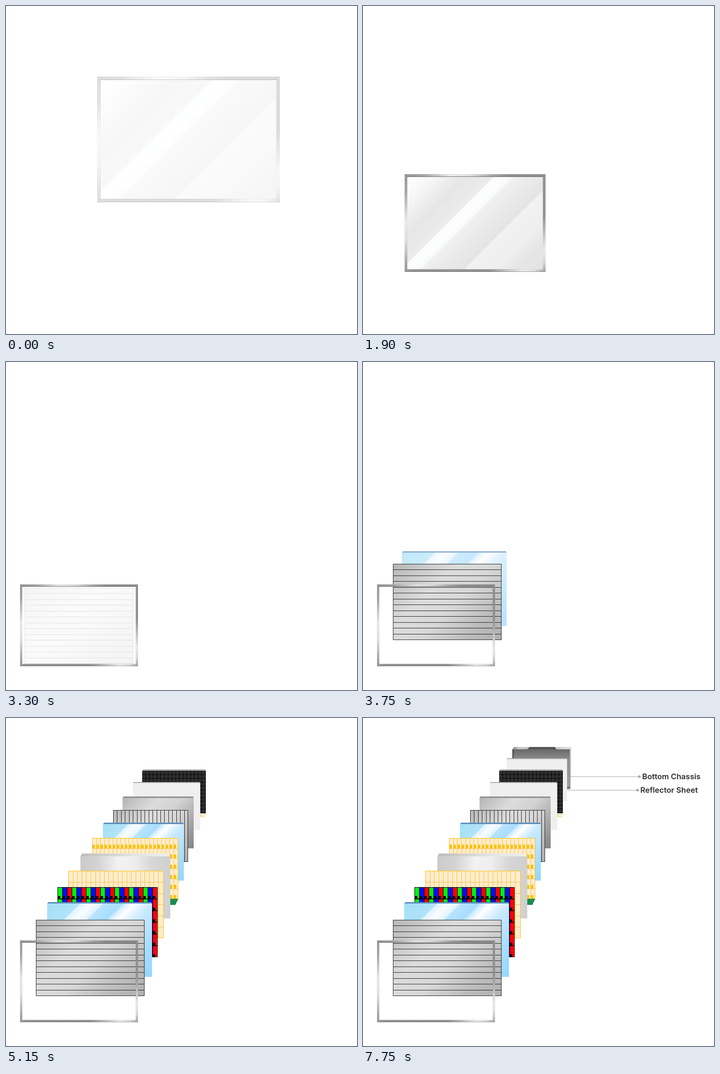
Animation of 750 by 702 pixels, one loop 8 s. Source, as an HTML page with a canvas:

```html
<!DOCTYPE html>
<html lang="en">
<head>
<meta charset="utf-8">
<style>
  html, body { margin: 0; width: 100%; height: 100%; overflow: hidden; background: #fff; }
  canvas { display: block; }
</style>
</head>
<body>
<canvas id="stage" width="750" height="702"></canvas>
<script>
const W = 750, H = 702, LOOP = 8000;
const stage = document.getElementById('stage').getContext('2d');
const clamp = v => Math.max(0, Math.min(1, v));
const mix = (a, b, p) => a + (b - a) * p;

// Stops are written as "offset colour, offset colour, ..."
function gradient(c, x0, y0, x1, y1, stops) {
  const g = c.createLinearGradient(x0, y0, x1, y1);
  for (const stop of stops.split(',')) {
    const [at, colour] = stop.trim().split(' ');
    g.addColorStop(+at, colour);
  }
  return g;
}
// 45 degree sweep from the top left to the bottom right corner
function diagonal(c, x, y, w, h, stops) {
  const d = (w + h) / 2;
  return gradient(c, x, y, x + d, y + d, stops);
}
function rect(c, x, y, w, h, fill) {
  c.fillStyle = fill;
  c.fillRect(x, y, w, h);
}
function poly(c, fill, ...p) {
  c.beginPath();
  for (let i = 0; i < p.length; i += 2) c.lineTo(p[i], p[i + 1]);
  c.closePath();
  c.fillStyle = fill;
  c.fill();
}

const METAL = '0 #989898, .08 #a8a8a8, .2 #f0f0f0, .28 #e4e4e4, .38 #a8a8a8, .44 #939393, .76 #939393, .9 #f0f0f0, .95 #e0e0e0, 1 #a0a0a0';
const SHEEN = '0 #fff, .1 #f8f8f8, .25 #e6e6e6, .38 #ececec, .381 #fcfefe, .43 #fcfefe, .465 #f7f8f8, .466 #f0f0f0, .65 #e4e4e4, .66 #f2f2f2, .8 #eee, .88 #e6e6e6, 1 #e3e3e3';
const SILVER = '0 #b5b5b5, .12 #c4c4c4, .35 #dcdcdc, .55 #d8d8d8, .8 #bcbcbc, 1 #b0b0b0';
const GLASS = '0 #a4dff6, .18 #b0e3f8, .19 #e2f4fd, .25 #f8fcff, .31 #e2f3fe, .32 #b8e3ff, .42 #a8ddff, .44 #d4eeff, .49 #fff, .54 #e2f3ff, .6 #c8e9ff, .84 #a3dcff, 1 #96d6ff';

function drawFrame(c, x, y, w, h) {
  const b = w * 0.0185;
  c.beginPath();
  c.rect(x, y, w, h);
  c.rect(x + b, y + b, w - 2 * b, h - 2 * b);
  c.fillStyle = diagonal(c, x, y, w, h, METAL);
  c.fill('evenodd');
  c.strokeStyle = 'rgba(70,70,70,.15)';
  c.lineWidth = 1;
  c.strokeRect(x + .5, y + .5, w - 1, h - 1);
  c.strokeRect(x + b - .5, y + b - .5, w - 2 * b + 1, h - 2 * b + 1);
  rect(c, x + b - 1, y + b - 1, w - 2 * b + 2, 1, 'rgba(60,60,60,.7)');
  rect(c, x, y + h - 1, w, 1, 'rgba(70,70,70,.4)');
}

function drawGlassPanel(c, x, y, w, h) {
  const b = w * 0.0185;
  rect(c, x + b, y + b, w - 2 * b, h - 2 * b, diagonal(c, x + b, y + b, w - 2 * b, h - 2 * b, SHEEN));
}

function polarizer(c, x, y, w, h, count, upright) {
  rect(c, x, y, w, h, diagonal(c, x, y, w, h, SILVER));
  c.strokeStyle = '#222';
  c.strokeRect(x + .5, y + .5, w - 1, h - 1);
  for (let i = 1; i < count; i++) {
    if (upright) rect(c, Math.round(x + i * w / count), y, 1, h, '#222');
    else rect(c, x, Math.round(y + i * (h - 1) / count), w, 1, '#222');
  }
}

function glass(c, x, y, w, h) {
  poly(c, '#5a8dbe', x + 3, y, x + w - 2, y, x + w, y + 3, x, y + 3);
  rect(c, x, y + 3, w, h - 3, diagonal(c, x, y + 3, w, h - 3, GLASS));
}

function colourFilter(c) {
  rect(c, 110, 362, 214, 150, '#000');
  for (let col = 0; col < 21; col++) {
    for (let row = 0; row < 6; row++) {
      const x = 110 + col * 10.15, y = 362 + row * 25;
      c.fillStyle = ['#00f010', '#0010ff', '#ff0000'][col % 3];
      c.beginPath();
      c.roundRect(x + 1, y + 1, 9, 23.5, 1.5);
      c.fill();
      rect(c, x + 1, y + 19, 5, 6, '#000');
    }
  }
}

function yellowGrid(c, x, y, w, h, pitch, blocks) {
  const rowHeight = h / 6;
  rect(c, x, y, w, h, '#fdecce');
  for (let row = 1; row < 6; row++) rect(c, x, Math.round(y + row * rowHeight), w, 1, '#f3bd5c');
  for (let col = 0; col < 21; col++) {
    const left = x + col * pitch;
    if (col) rect(c, Math.round(left), y, 1, h, '#ffc61a');
    if (blocks) for (let row = 1; row <= 6; row++)
      rect(c, left + .5, Math.round(y + row * rowHeight) - 8, 5.3, 8, '#ffc000');
  }
  c.strokeStyle = '#ffc000';
  c.strokeRect(x + .5, y + .5, w - 1, h - 1);
}

function diffuser(c) {
  poly(c, gradient(c, 159, 0, 351, 0, '0 #bcbcbc, .3 #d2d2d2, .6 #e4e4e4, 1 #eef0ee'), 163, 290, 348, 290, 351, 296, 159, 296);
  rect(c, 159, 296, 192, 133, gradient(c, 159, 0, 351, 0, '0 #cacaca, .2 #d4d4d4, .42 #f2f2f2, .6 #eee, .8 #d6d6d6, 1 #d0d0d0'));
}

function board(c) {
  poly(c, '#1c8a50', 184, 387, 368, 387, 362, 400, 180, 400);
  yellowGrid(c, 184, 257, 184, 130, 8.7, true);
}

function sheet(c, x, y, w, h, strip, edge, fill) {
  poly(c, edge, x + 2, y, x + w - 1, y, x + w, y + strip, x, y + strip);
  rect(c, x, y + strip, w, h - strip, fill);
}

function lightArray(c) {
  c.strokeStyle = '#f3bb3c';
  for (let x = 289; x < 420; x += 9.1) {
    c.beginPath();
    c.moveTo(x + 2, 206.5);
    c.lineTo(x + 9.5, 206.5);
    c.lineTo(x + 7.5, 211.5);
    c.lineTo(x, 211.5);
    c.closePath();
    c.stroke();
  }
  sheet(c, 291, 110, 136, 94, 3, '#acacac', '#1b1b1b');
  c.strokeStyle = '#585858';
  for (let row = 0; row < 11; row++) {
    for (let col = 0; col < 17; col++) {
      c.beginPath();
      c.arc(294.5 + col * 8, 117 + row * 8.2, 2.1, 0, 7);
      c.stroke();
    }
  }
}

function chassis(c) {
  poly(c, diagonal(c, 319, 62, 126, 90, '0 #777, .08 #ccc, .3 #aaa, .55 #ddd, .8 #aaa, 1 #777'), 319, 67, 323, 62, 445, 62, 443, 152, 319, 152);
  rect(c, 320, 67, 122, 80, gradient(c, 0, 67, 0, 147, '0 #696969, .3 #8f8f8f, 1 #a0a0a0'));
  rect(c, 319, 67, 3, 85, '#555');
  poly(c, '#757575', 320, 147, 442, 147, 443, 152, 319, 152);
  poly(c, '#565656', 356, 62, 410, 62, 413, 67, 351, 67);
}

// Front to back
const painters = [
  c => polarizer(c, 64, 432, 232, 163, 13),
  c => glass(c, 88, 394, 224, 160),
  colourFilter,
  c => yellowGrid(c, 133, 327, 204, 144, 9.6),
  diffuser,
  board,
  c => glass(c, 207, 224, 173, 124),
  c => polarizer(c, 229, 197, 160, 111, 19, true),
  c => sheet(c, 249, 168, 152, 111, 3, '#8f8f8f', diagonal(c, 249, 171, 152, 108, '0 #b4b4b4, .3 #dcdcdc, .5 #d2d2d2, .8 #a0a0a0, 1 #848484')),
  c => sheet(c, 271, 137, 144, 103, 2, '#a8a8a8', '#efefef'),
  lightArray,
  c => sheet(c, 307, 86, 129, 92, 2, '#ababab', '#efefef'),
  chassis
];
const layers = painters.map((paint, i) => {
  const canvas = document.createElement('canvas');
  canvas.width = W;
  canvas.height = H;
  paint(canvas.getContext('2d'));
  return i
    ? { canvas, start: 3550 + i * 150, steps: 3, dx: -16, dy: 34 }
    : { canvas, start: 3300, steps: 8, dx: -27, dy: 58 };
});

const labels = [
  { text: 'Bottom Chassis', start: 6450, from: 444, to: 590, y: 125 },
  { text: 'Reflector Sheet', start: 7350, from: 436, to: 586, y: 154 }
];

// Progress that advances in equal jumps, the first one at the start time
const stepped = (t, start, length, count) => clamp((Math.floor((t - start) / length) + 1) / count);
// A slight ease at both ends
const soften = p => p - 0.008 * Math.sin(2 * Math.PI * p);

function drawLabel({ text, start, from, to, y }, t) {
  const c = stage;
  c.globalAlpha = stepped(t, start, 50, 9);
  rect(c, from, y, to - from, 1, '#a6a6a6');
  c.beginPath();
  c.arc(to + .5, y + .5, 2.7, 0, 7);
  c.fill();
  c.fillStyle = '#2d2d2d';
  c.font = '600 16.5px Inter, sans-serif';
  c.fillText(text, to + 6.5, y + 6);
}

function draw(t) {
  const c = stage;
  c.globalAlpha = 1;
  rect(c, 0, 0, W, H, '#fff');

  for (let i = layers.length - 1; i >= 0; i--) {
    const { canvas, start, steps, dx, dy } = layers[i];
    const p = stepped(t, start, 50, steps);
    if (!p) continue;
    c.globalAlpha = p;
    c.drawImage(canvas, Math.round(dx * (1 - p)), Math.round(dy * (1 - p)));
  }

  const move = soften(stepped(t, 1300, 100, 11));
  const edge = (from, to) => Math.round(mix(from, to, move));
  const left = edge(195.4, 30.4), top = edge(151, 476);
  const box = [left, top, edge(585, 282) - left, edge(420, 651.4) - top];
  c.globalAlpha = stepped(t, 100, 100, 3) || 1 / 3;
  if (t < 3300) drawGlassPanel(c, ...box);
  drawFrame(c, ...box);

  for (const label of labels) if (t >= label.start) drawLabel(label, t);
}

function tick() {
  draw(performance.now() % LOOP);
  requestAnimationFrame(tick);
}
tick();
</script>
</body>
</html>
```
